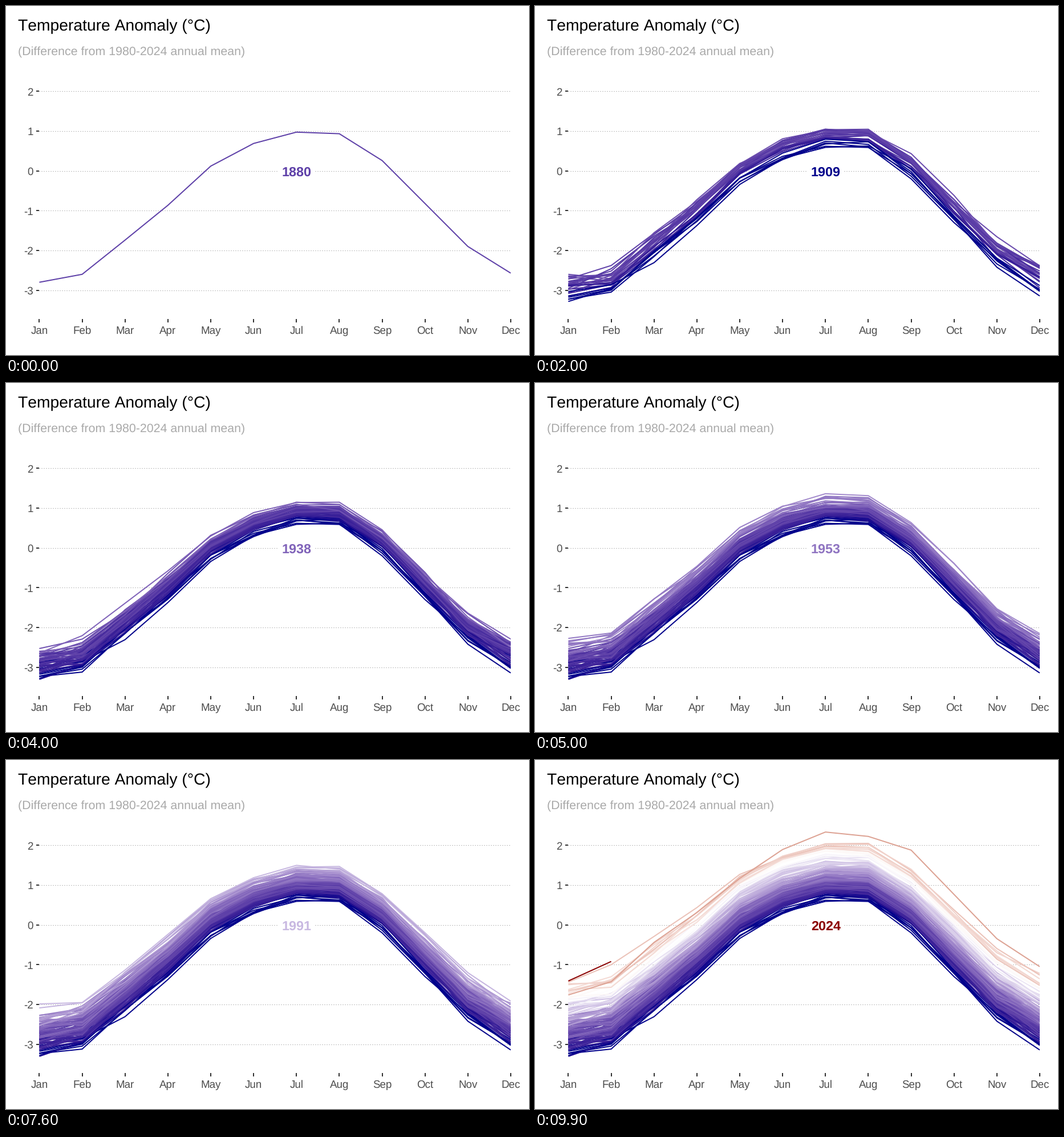
Recreate the animation shown at these times as a matplotlib script. Size 917 px wide and 611 px high, loop 10000 ms.

```python
import numpy as np
import matplotlib.pyplot as plt
from matplotlib.animation import FuncAnimation
from matplotlib.patches import Rectangle

W, H, DPI = 917, 611, 64
PT = 72 / DPI                      # points per pixel
FRAMES, START, END = 100, 1880, 2024
LEFT, STEP, ZERO, UNIT = 58.4, 75.14, 288.7, 69.63
MONTHS = "Jan Feb Mar Apr May Jun Jul Aug Sep Oct Nov Dec".split()

# the first year's curve, which all later years shift and roughen
CYCLE = np.array([-2.80, -2.60, -1.74, -.865, .12, .69,
                  .975, .935, .26, -.82, -1.90, -2.57])

# turning points of the yearly mean anomaly
TREND = {1880: -.17, 1882: -.10, 1887: -.35, 1889: -.12, 1892: -.32,
         1897: -.11, 1901: -.15, 1904: -.46, 1909: -.48, 1914: -.16,
         1917: -.46, 1921: -.19, 1929: -.33, 1938: 0, 1944: .19, 1950: -.16,
         1953: .08, 1964: -.17, 1973: .16, 1976: -.09, 1981: .31, 1985: .13,
         1991: .40, 1993: .24, 1998: .60, 2000: .42, 2010: .70, 2014: .74,
         2016: 1.01, 2018: .86, 2020: 1.01, 2022: .89, 2023: 1.17, 2024: 1.35}

# exceptional years: (month, rise above the first year) key points
STANDOUT = {2016: [(0, 1.36), (1, 1.60), (2, 1.45), (5, 1.0), (11, 1.05)],
            2023: [(0, 1.04), (2, 1.30), (4, 1.05), (6, 1.36), (7, 1.29),
                   (8, 1.62), (11, 1.52)],
            2024: [(0, 1.39), (1, 1.68)]}

rng = np.random.default_rng(7)
years = np.arange(START, END + 1)
months = np.arange(12)


def yearly_means():
    wobble = rng.normal(0, .04, len(years)).clip(-.07, .07)
    wobble[np.isin(years, list(TREND))] = 0
    return np.interp(years, list(TREND), list(TREND.values())) + wobble


def monthly_curves(means):
    """Shift the cycle by each year's mean; winters vary most."""
    wave = np.cos(2 * np.pi * months / 12)
    raw = rng.normal(size=(len(years), 13))
    noise = ((raw[:, :12] + .7 * raw[:, 1:]) / 1.22).clip(-1.7, 1.7)
    noise *= .06 + .08 * ((1 + wave) / 2) ** 2
    noise *= np.linspace(1.1, .75, len(years))[:, None]
    noise[0] = 0
    rise = (means - means[0])[:, None] * (1 + .08 * wave) + noise
    for year, keys in STANDOUT.items():
        rise[year - START] = np.interp(months, *zip(*keys), right=np.nan)
    return CYCLE + rise


# colours blend through white in CIE Lab
M = np.array([[.4124564, .3575761, .1804375],
              [.2126729, .7151522, .0721750],
              [.0193339, .1191920, .9503041]])
WHITE = M.sum(axis=1)


def to_lab(rgb):
    c = np.array(rgb, float)
    c = np.where(c > .04045, ((c + .055) / 1.055) ** 2.4, c / 12.92)
    f = M @ c / WHITE
    f = np.where(f > .008856, np.cbrt(f), 7.787 * f + 16 / 116)
    return np.array([116 * f[1] - 16, 500 * (f[0] - f[1]), 200 * (f[1] - f[2])])


def to_rgb(lab):
    y = (lab[0] + 16) / 116
    f = np.array([y + lab[1] / 500, y, y - lab[2] / 200])
    xyz = np.where(f > .2069, f ** 3, (f - 16 / 116) / 7.787) * WHITE
    c = np.linalg.solve(M, xyz).clip(0, 1)
    return np.where(c > .0031308, 1.055 * c ** (1 / 2.4) - .055, 12.92 * c).clip(0, 1)


BLUE, RED = to_lab((0, 0, 139 / 255)), to_lab((139 / 255, 0, 0))
MID = np.array([100., 0, 0])


def shade(mean):
    t = np.clip((mean - .71) / 1.17, -1, 1)
    return to_rgb(MID + abs(t) * ((RED if t > 0 else BLUE) - MID))


plt.rcParams.update({"font.family": "Liberation Sans", "text.hinting": "none",
                     "text.kerning_factor": 10})   # effectively no kerning
fig = plt.figure(figsize=(W / DPI, H / DPI), dpi=DPI, facecolor="white")
ax = fig.add_axes([0, 0, 1, 1])
ax.set(xlim=(0, W), ylim=(H, 0))
ax.axis("off")


def text(x, y, s, px, color, ha="left", **kw):
    return ax.text(x, y, s, fontsize=px * PT, color=color, ha=ha, va="baseline", **kw)


def rule(xs, ys, color, px, **kw):
    return ax.plot(xs, ys, color=color, lw=px * PT, solid_capstyle="butt", **kw)[0]


xs = LEFT + STEP * months
text(21.2, 43, "Temperature Anomaly (°C)", 28.2, "black")
text(21.2, 85.3, "(Difference from 1980-2024 annual mean)", 21.4, "#a9a9a9")

for v in range(-3, 3):
    y = ZERO - UNIT * v
    rule([LEFT, xs[-1]], [y, y], "#808080", 1, ls=(0, (1, 3)),
         dash_capstyle="butt", zorder=1)
    rule([LEFT - 5.9, LEFT], [y, y], "#333333", 2)
    text(47.9, y + 7.2, str(v), 18.8, "#4d4d4d", "right")
for x, name in zip(xs, MONTHS):
    rule([x, x], [547.6, 553.5], "#333333", 2)
    text(x, 573.7, name, 18.8, "#4d4d4d", "center")

means = yearly_means()
colors = [shade(m) for m in means]
colors[-1] = to_rgb(RED)
panel = Rectangle((LEFT, 100), xs[-1] - LEFT, 450, transform=ax.transData)
lines = []
for i, curve in enumerate(monthly_curves(means)):
    line = rule(xs, ZERO - UNIT * curve, colors[i], 2,
                zorder=3 + i / 1000, solid_joinstyle="round", visible=False)
    line.set_clip_path(panel)
    lines.append(line)

ax.add_patch(Rectangle((477.5, 275), 64, 29, fc="white", ec="none", zorder=5))
label = text(509.7, 298, "", 23.4, "black", "center", weight="bold", zorder=6)


def update(k):
    last = round(k * (END - START) / (FRAMES - 1))
    for i, line in enumerate(lines):
        line.set_visible(i <= last)
    label.set_text(str(START + last))
    label.set_color(colors[last])
    return lines + [label]


anim = FuncAnimation(fig, update, frames=FRAMES, interval=100,
                     repeat=True, repeat_delay=0, blit=False)
plt.show()
```
